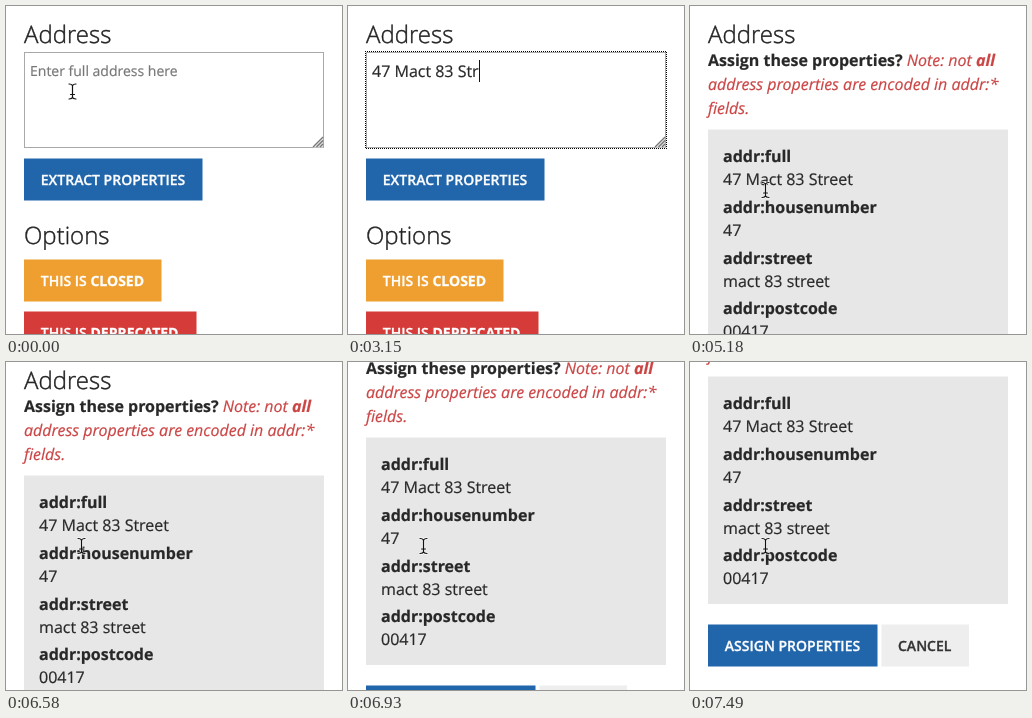
These frames come from a looping animation (336 px wide and 328 px high, 8000 ms). An HTML page:

```html
<!DOCTYPE html>
<html lang="en">
<head>
<meta charset="utf-8">
<title>Address form</title>
<style>
  html, body { margin: 0; width: 100%; height: 100%; overflow: hidden; background: #fff; }
  svg { display: block; width: 336px; height: 328px; }
  text {
    font: 16px "Open Sans", "Noto Sans", sans-serif;
    fill: currentColor; stroke: currentColor; stroke-width: .2px;
    color: #282828; white-space: pre; text-rendering: geometricPrecision;
  }
  tspan { fill: currentColor; stroke: currentColor; }
  .title { font-size: 24px; font-weight: 300; color: #222; stroke-width: .4px; }
  .hint { font-size: 14px; color: #777; }
  .bold { font-weight: 700; }
  .note { font-style: italic; color: #cb4545; }
  .plain { font-weight: 400; }
  .btn { font-size: 14px; font-weight: 600; color: #fff; stroke-width: .3px; }
  .dark { color: #333; }
  #extract { fill: #2165ab; }
  #extract.hover { fill: #1c5792; }
  #focus { shape-rendering: crispEdges; }
</style>
</head>
<body>
<svg viewBox="0 0 336 328">
  <defs>
    <path id="ibeam" d="M-3.5-7.5Q-.3-7.5 0-5.5Q.3-7.5 3.5-7.5M0-5.5V5.5M-3.5 7.5Q-.3 7.5 0 5.5Q.3 7.5 3.5 7.5M-2 3H2"/>
  </defs>

  <g id="page">
    <text class="title" x="18" y="36.5">Address</text>

    <g id="form">
      <rect x="18.5" y="46.5" width="299" height="95" fill="#fff" stroke="#a9a9a9"/>
      <path d="M307 141.5L317 131.5V141.5Z" fill="#ddd"/>
      <path d="M307 141l10-10M310.5 141l6.5-6.5M314 141l3-3" stroke="#777" stroke-width="1.2" fill="none"/>
      <rect id="focus" x="17.5" y="45.5" width="301" height="97" fill="none" stroke="#000" stroke-dasharray="1" stroke-dashoffset=".5"/>
      <text id="hint" class="hint" x="24" y="70">Enter full address here</text>
      <text id="typed" x="24" y="71"></text>
      <rect id="caret" y="54" width="1" height="22" fill="#111"/>

      <rect id="extract" x="18" y="152.5" width="178.5" height="42"/>
      <text class="btn" x="34.8" y="179">EXTRACT PROPERTIES</text>

      <text class="title" x="18" y="237.5">Options</text>
      <rect x="18" y="253.5" width="137.5" height="42" fill="#ee9f30"/>
      <text class="btn" x="34.8" y="279.5">THIS IS <tspan class="bold">CLOSED</tspan></text>
      <rect x="18" y="305.5" width="172.5" height="42" fill="#d53b39"/>
      <text class="btn" x="34.8" y="331.5">THIS IS <tspan class="bold">DEPRECATED</tspan></text>
    </g>

    <g id="result">
      <text class="bold" x="18" y="60">Assign these properties?<tspan class="note plain"> Note: not </tspan><tspan class="note">all</tspan></text>
      <text class="note" x="18" y="84">address properties are encoded in addr:*</text>
      <text class="note" x="18" y="108">fields.</text>
      <rect x="18" y="123.5" width="300" height="227.5" fill="#e7e7e7"/>
      <g id="fields"></g>
      <rect x="18" y="371.5" width="169.5" height="42" fill="#2165ab"/>
      <text class="btn" x="34.8" y="397.5">ASSIGN PROPERTIES</text>
      <rect x="191.5" y="371.5" width="87.5" height="42" fill="#eee"/>
      <text class="btn dark" x="208" y="397.5">CANCEL</text>
    </g>
  </g>

  <g id="cursor">
    <g id="beam" fill="none" stroke-linecap="round">
      <use href="#ibeam" stroke="#fff" stroke-width="2.6" stroke-opacity=".7"/>
      <use href="#ibeam" stroke="#111" stroke-width="1.2"/>
    </g>
    <path id="hand" d="M-1.5 1Q0-1 1.5 1V7Q3 5.5 4.5 7.3Q6 6.2 7.3 8Q9 7.3 9.5 9V13Q9 15 8 18H0Q-1 15-3 13L-6 10Q-6 7.5-3.5 8.5L-1.5 10.5Z" fill="#fff" stroke="#111" stroke-linejoin="round"/>
  </g>
</svg>

<script>
const LOOP = 8000, TICK = 70;
const ADDRESS = "47 Mact 83 Street";
const KEYS = [700, 910, 1050, 1260, 1400, 1610, 1680, 1750, 2100,
              2310, 2520, 2800, 3010, 3150, 3360, 3500, 3570];
const SCROLL = [[6510, 0], [6580, 10], [6930, 48], [7350, 97], [7490, 109]];
const FIELDS = [["full", ADDRESS], ["housenumber", "47"],
                ["street", "mact 83 street"], ["postcode", "00417"]];

const $ = id => document.getElementById(id);
const show = (id, on) => { $(id).style.display = on ? "" : "none"; };
const within = (t, from, to) => t >= from && t < to;
const clamp = v => Math.min(1, Math.max(0, v));
const ease = p => p * p * (3 - 2 * p);

$("fields").innerHTML = FIELDS.map(([key, value], i) => {
  const y = 156 + i * 50.75;
  return `<text class="bold" x="33" y="${y}">addr:${key}</text><text x="33" y="${y + 23}">${value}</text>`;
}).join("");

function scrollAt(t) {
  let y = 0;
  for (let i = 1; i < SCROLL.length; i++) {
    const [t0, y0] = SCROLL[i - 1], [t1, y1] = SCROLL[i];
    if (t >= t0) y = y0 + (y1 - y0) * clamp((t - t0) / (t1 - t0));
  }
  return Math.round(y);
}

function draw(now) {
  const t = Math.floor((now % LOOP) / TICK) * TICK;
  const done = t >= 5040;
  show("form", !done);
  show("result", done);

  if (!done) {
    const focused = within(t, 70, 4900);
    show("focus", focused);
    show("hint", t < KEYS[0]);
    $("typed").textContent = ADDRESS.slice(0, KEYS.filter(k => k <= t).length);
    $("caret").setAttribute("x", 24 + Math.round($("typed").getComputedTextLength()));
    show("caret", focused && !within(t, 4130, 4690));
  }

  // The pointer hides while typing, then moves down to the button.
  const p = ease(clamp((t - 4130) / 630));
  const x = 66.5 + 9 * p, y = 85.5 + 98.5 * p;
  const hand = y > 152.5 && t < 5180;
  $("cursor").setAttribute("transform", `translate(${x} ${y})`);
  show("cursor", !within(t, 770, 4130));
  show("beam", !hand);
  show("hand", hand);
  $("extract").classList.toggle("hover", hand);

  $("page").setAttribute("transform", `translate(0 ${-scrollAt(t)})`);
}

function frame() {
  draw(performance.now());
  requestAnimationFrame(frame);
}
frame();
</script>
</body>
</html>
```
